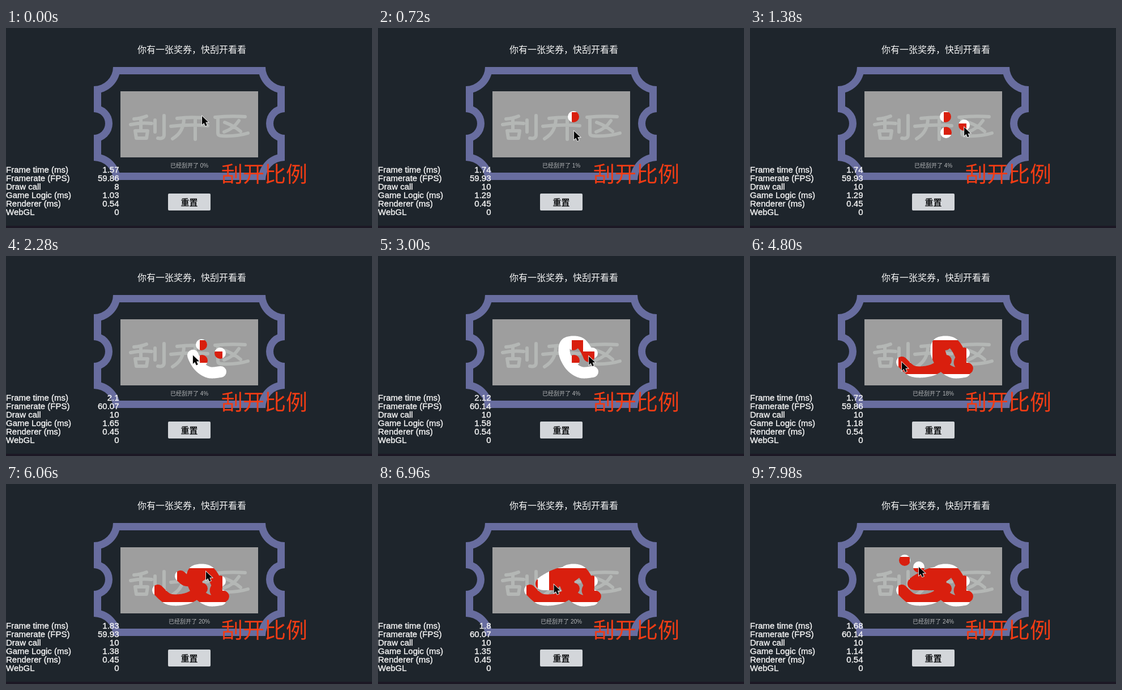
An HTML page with a canvas for the animation above (8000 ms loop, 646 by 354 pixels).

```html
<!DOCTYPE html>
<html lang="zh">
<head>
<meta charset="utf-8">
<title>刮刮卡</title>
<style>
html, body { margin: 0; width: 100%; height: 100%; overflow: hidden; background: #1e252c; }
canvas { display: block; }
</style>
</head>
<body>
<canvas id="stage" width="646" height="354"></canvas>
<script>
const LOOP = 8000, BRUSH = 10, CELL = 20, CELL_COUNT = 80, RELEASE_DELAY = 100;
const GRID = { x: 202, y: 109 };
const BG = '#1e252c', PURPLE = '#686d9f', RED = '#d91f0e', WHITE = '#f4f4f4';
const CJK = '"Noto Sans CJK SC", "Noto Sans CJK", sans-serif';
const LATIN = '"Liberation Sans", sans-serif';

const canvas = document.getElementById('stage');
const ctx = canvas.getContext('2d');
const layer = document.createElement('canvas');
layer.width = canvas.width;
layer.height = canvas.height;
const mask = layer.getContext('2d');

const mix = (a, b, k) => [a[0] + (b[0] - a[0]) * k, a[1] + (b[1] - a[1]) * k];
const last = list => list[list.length - 1];

// Smooth curve through a few points (Catmull-Rom)
function curve(pts, steps = 24) {
  const at = i => pts[Math.max(0, Math.min(pts.length - 1, i))];
  const out = [pts[0]];
  for (let i = 0; i < pts.length - 1; i++) {
    for (let s = 1; s <= steps; s++) {
      const u = s / steps;
      out.push([0, 1].map(d => {
        const [a, b, c, e] = [-1, 0, 1, 2].map(j => at(i + j)[d]);
        return b + u / 2 * (c - a + u * (2 * a - 5 * b + 4 * c - e + u * (3 * (b - c) + e - a)));
      }));
    }
  }
  return out;
}

// The first part of a path, by share of its length
function partOf(path, share) {
  const lens = path.slice(1).map((p, i) => Math.hypot(p[0] - path[i][0], p[1] - path[i][1]));
  let left = share * lens.reduce((a, b) => a + b, 0);
  const out = [path[0]];
  for (let i = 0; i < lens.length && left > 0; i++) {
    out.push(mix(path[i], path[i + 1], Math.min(1, left / lens[i])));
    left -= lens[i];
  }
  return out;
}

// A tap or a drag; the cells it crossed count once it is released
function touch(start, duration, ...pts) {
  const path = curve(pts), end = start + duration;
  const cells = new Set(path.map(([x, y]) =>
    Math.floor((x - GRID.x) / CELL) + ',' + Math.floor((y - GRID.y) / CELL)));
  return {
    start, end, path, cells, release: end + RELEASE_DELAY,
    trail: t => partOf(path, duration ? Math.min(1, (t - start) / duration) : 1)
  };
}

const touches = [
  touch(360, 0, [345, 157]),
  touch(780, 0, [346, 185]),
  touch(1200, 0, [378, 172]),
  touch(1680, 1600, [379, 205], [358, 206], [340, 194], [329, 172], [333, 154], [357, 154], [372, 177], [370, 190], [384, 199]),
  touch(3960, 740, [335, 170], [338, 190], [318, 203], [288, 204], [268, 188]),
  touch(5160, 720, [308, 163], [319, 171], [336, 167], [353, 155]),
  touch(6180, 960, [353, 155], [318, 159], [288, 176], [310, 178], [332, 178]),
  touch(7400, 0, [273, 135]),
  touch(7900, 0, [298, 147])
];

function cursorAt(t) {
  let from = [346, 156], since = 0;
  for (const { start, end, release, path, trail } of touches) {
    if (t < start) {
      const k = Math.max(0, (t - since) / (start - since));
      return mix(from, path[0], k * k * (3 - 2 * k));
    }
    if (t < end) return last(trail(t));
    from = last(path);
    since = release;
  }
  return from;
}

// Brush lettering on the cover
const lettering = new Path2D(
  'M248 156Q238 160 226 161M220 171Q238 167 257 169M238 159v22M228 182h22l-2 13h-18z' +
  'M263 163v21M279 155v35q-1 7-11 5' +
  'M302 160q22-3 44-1M291 174q33-4 65-1M314 160q0 24-20 36M334 160v37' +
  'M369 158q26-3 53-1M374 159v27q0 5 8 5 26 1 45-5M411 164q-9 14-26 20M386 167q16 6 28 16');

function text(str, x, y, font, color, align = 'center') {
  ctx.font = font;
  ctx.fillStyle = color;
  ctx.textAlign = align;
  ctx.fillText(str, x, y);
}

function disc(x, y, r, color) {
  ctx.fillStyle = color;
  ctx.beginPath();
  ctx.arc(x, y, r, 0, Math.PI * 2);
  ctx.fill();
}

function box(x, y, w, h, color) {
  ctx.fillStyle = color;
  ctx.fillRect(x, y, w, h);
}

function drawTicket() {
  const left = 155, top = 69, w = 337, h = 200, band = 13;
  ctx.save();
  ctx.beginPath();
  ctx.rect(left, top, w, h);
  ctx.clip();
  box(left, top, w, h, PURPLE);
  box(left + band, top + band, w - 2 * band, h - 2 * band, BG);
  // Notches at the four corners and the middle of both sides
  for (const x of [left, left + w]) {
    for (const part of [0, 0.5, 1]) {
      const y = top + h * part, r = part === 0.5 ? 20 : 34;
      disc(x, y, r + band, PURPLE);
      disc(x, y, r, BG);
    }
  }
  ctx.restore();
}

function drawCover() {
  box(202, 112, 243, 117, '#9e9e9e');
  ctx.strokeStyle = '#b4b7b5';
  ctx.lineWidth = 6;
  ctx.lineCap = ctx.lineJoin = 'round';
  ctx.stroke(lettering);
}

// Scratched paths, with the counted cells tinted; returns how many count
function drawScratches(t) {
  const hit = new Set();
  mask.globalCompositeOperation = 'source-over';
  mask.clearRect(0, 0, layer.width, layer.height);
  mask.strokeStyle = '#fff';
  mask.lineWidth = BRUSH * 2;
  mask.lineCap = mask.lineJoin = 'round';
  for (const { start, release, trail, cells } of touches) {
    if (t < start) break;
    const pts = trail(t);
    mask.beginPath();
    mask.moveTo(...pts[0]);
    for (const p of pts) mask.lineTo(...p);
    mask.stroke();
    if (t >= release) cells.forEach(c => hit.add(c));
  }
  mask.globalCompositeOperation = 'source-atop';
  mask.fillStyle = RED;
  for (const key of hit) {
    const [col, row] = key.split(',').map(Number);
    mask.fillRect(GRID.x + col * CELL, GRID.y + row * CELL, CELL, CELL);
  }
  ctx.drawImage(layer, 0, 0);
  return hit.size;
}

// Readings refresh at a steady pace and drift in slow waves
function drawStats(t) {
  const n = Math.floor((t + 165) / 825);
  const round = v => Math.round(v * 100) / 100;
  const logic = round(1.03 + 0.85 * Math.sin(Math.PI * n / 5) ** 2 * Math.exp(-n / 9));
  const renderer = round(0.48 + 0.06 * Math.cos(2.1 * n));
  const rows = {
    'Frame time (ms)': round(logic + renderer),
    'Framerate (FPS)': round(60 - 0.14 * Math.cos(Math.PI * n / 3)),
    'Draw call': n ? 10 : 8,
    'Game Logic (ms)': logic,
    'Renderer (ms)': renderer,
    'WebGL': 0
  };
  ctx.strokeStyle = WHITE;
  ctx.lineWidth = 0.4;
  Object.entries(rows).forEach(([name, value], i) => {
    const y = 256 + i * 15;
    text(name, 0, y, '15px ' + LATIN, WHITE, 'left');
    ctx.strokeText(name, 0, y);
    text(value, 199.5, y, '15px ' + LATIN, WHITE, 'right');
    ctx.strokeText(value, 199.5, y);
  });
}

const arrow = new Path2D('M0 0v15l3.4-3.1 2.5 5.5 2.8-1.2-2.4-5.4 4.7-.2z');

function drawCursor([x, y]) {
  ctx.save();
  ctx.translate(x, y);
  ctx.lineJoin = 'miter';
  ctx.lineWidth = 1.8;
  ctx.strokeStyle = '#eee';
  ctx.stroke(arrow);
  ctx.fillStyle = '#050505';
  ctx.fill(arrow);
  ctx.restore();
}

function draw(t) {
  box(0, 0, 646, 354, BG);
  box(0, 350, 646, 4, '#1c1824');
  drawTicket();
  drawCover();
  const percent = Math.round(drawScratches(t) / CELL_COUNT * 100);
  text('你有一张奖券，快刮开看看', 328, 44, '16px ' + CJK, '#f6f6f6');
  text(`已经刮开了 ${percent}%`, 323.5, 247, '10px "Liberation Sans", ' + CJK, '#b4b6b8');
  ctx.fillStyle = '#d3d6da';
  ctx.beginPath();
  ctx.roundRect(286, 293, 75, 30, 2);
  ctx.fill();
  text('重置', 323.5, 313.5, 'bold 15px ' + CJK, '#101214');
  drawStats(t);
  text('刮开比例', 456, 272, '300 38px ' + CJK, '#f23c14');
  drawCursor(cursorAt(t));
}

const began = performance.now();
function tick() {
  draw((performance.now() - began) % LOOP);
  requestAnimationFrame(tick);
}
tick();
</script>
</body>
</html>
```
